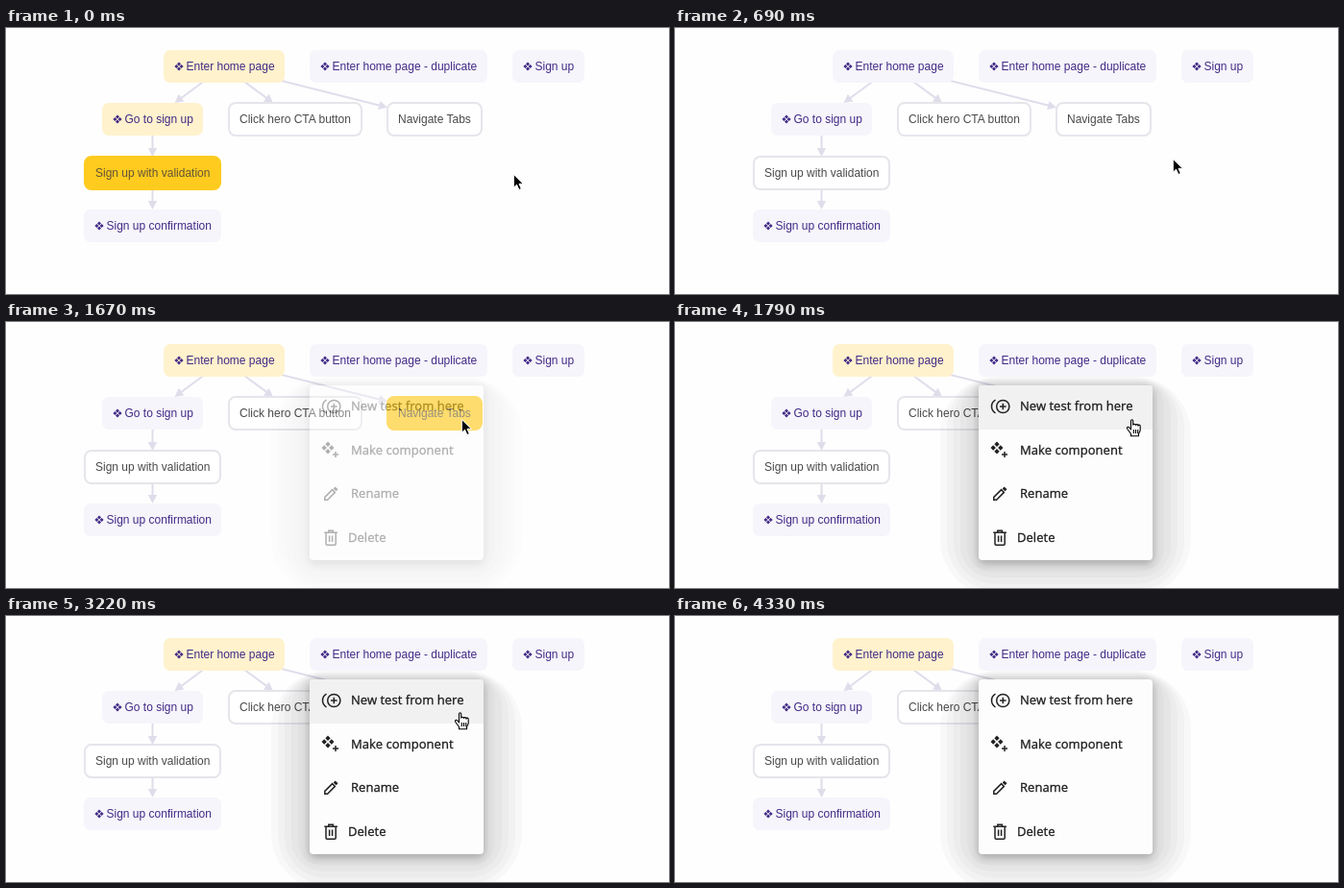
Recreate the animation shown at these times as an HTML page. Size 690 by 277 pixels, loop 4.51 s.

```html
<!DOCTYPE html>
<html lang="en">
<head>
<meta charset="utf-8">
<title>Test flow menu</title>
<style>
html, body { margin: 0; width: 100%; height: 100%; overflow: hidden; background: #fefefe; }
svg { display: block; }
text { font: 12px "Liberation Sans", Arial, sans-serif; white-space: pre; }
.part rect { fill: #f6f5fb; }
.part { fill: #422a86; }
.step rect { fill: #fff; stroke: #e6e5eb; stroke-width: 2; }
.step { fill: #494949; }
.node.trail rect { fill: #fff2cd; }
.node.active rect { fill: #ffcb1f; stroke: #ffcb1f; }
.node.active { fill: #635436; }
#links { stroke: #e0ddeb; stroke-width: 2; fill: #e0ddeb; }
#menu text {
  font: 500 13px "Open Sans", "Noto Sans", sans-serif; letter-spacing: .04px;
  fill: #1c1c1c; stroke: #1c1c1c; stroke-width: .3;
}
#panel { fill: #fdfdfd; filter: drop-shadow(0 4px 5px rgba(0,0,0,.22)); }
.icon { fill: none; stroke: #222; stroke-width: 1.5; }
.solid { fill: #222; }
</style>
</head>
<body>
<svg width="690" height="277" xmlns="http://www.w3.org/2000/svg">
  <g id="links"></g>
  <g id="nodes"></g>
  <g id="menu">
    <g id="shade"></g>
    <rect id="panel" x="316" y="66" width="181" height="182" rx="4"/>
    <path id="hover" fill="#f1f1f1" d="M316 112V70q0-4 4-4h173q4 0 4 4v42z"/>
    <g class="icon">
      <circle cx="341.3" cy="88" r="6.6"/>
      <path d="M341.3 84.7v6.6M338 88h6.6M333.5 81.2A7.8 7.8 0 0 0 333.5 94.8"/>
      <path d="M343 135v6M340 138h6"/>
      <path d="M331.8 185.2v-2.8l7.8-7.8 2.8 2.8-7.8 7.8z"/>
      <path d="M331.3 219.2h13.6M335.8 219v-1.8h4.6v1.8M333 219.5V231q0 1.2 1.2 1.2h7.8q1.2 0 1.2-1.2V219.5M336.6 222.5v6.5M339.6 222.5v6.5"/>
    </g>
    <path class="solid" d="M340.7 173.5l2-2 2.8 2.8-2 2z"/>
    <path class="solid" id="gems"/>
    <text x="359" y="92">New test from here</text>
    <text x="359" y="138">Make component</text>
    <text x="359" y="183">Rename</text>
    <text x="356" y="229">Delete</text>
  </g>
  <g id="cursor">
    <path id="arrow" stroke="#fff" d="M.3.5V14.2L3.5 11.2 5.9 16.5 8.3 15.4 6 10.3H10.4z"/>
    <g id="hand" transform="translate(-6.5 -1)" stroke="#000" stroke-width="1.1" stroke-linejoin="round">
      <path fill="#fff" d="M5 11L3.2 8.9C2 7.6.3 8.6 1.2 10.2L5 15.5V17.8H13V15.6L14.7 12V7.4C14.7 5.8 12.5 5.8 12.4 7.1 12.4 5.2 10 5.2 9.8 6.5 9.6 4.8 7.4 4.9 7.2 6.2V2C7.2.4 5 .4 5 2z"/>
      <path d="M7.8 11v4M10 11v4M12.2 11v4"/>
    </g>
  </g>
</svg>
<script>
const LOOP = 4510, HALF = 17;
const $ = id => document.getElementById(id);
const add = (parent, markup) => parent.insertAdjacentHTML('beforeend', markup);
const gem = (x, y, r) => `M${x} ${y - r}l${r} ${r}l${-r} ${r}l${-r} ${-r}z`;
const ring = (x, y, gap, r) =>
  gem(x, y - gap, r) + gem(x - gap, y, r) + gem(x + gap, y, r) + gem(x, y + gap, r);

const nodes = {
  home: { label: 'Enter home page', kind: 'part', row: 0, x: 226.8 },
  copy: { label: 'Enter home page - duplicate', kind: 'part', row: 0, x: 408.5 },
  sign: { label: 'Sign up', kind: 'part', row: 0, x: 564 },
  go: { label: 'Go to sign up', kind: 'part', row: 1, x: 152.5, parent: 'home' },
  hero: { label: 'Click hero CTA button', kind: 'step', row: 1, x: 301, parent: 'home' },
  tabs: { label: 'Navigate Tabs', kind: 'step', row: 1, x: 446, parent: 'home' },
  valid: { label: 'Sign up with validation', kind: 'step', row: 2, x: 152.5, parent: 'go' },
  done: { label: 'Sign up confirmation', kind: 'part', row: 3, x: 152.5, parent: 'valid' }
};

// Each box is as wide as its label plus padding
for (const [id, node] of Object.entries(nodes)) {
  const { label, kind, row, x } = node;
  const part = kind === 'part';
  const y = node.y = Math.round(40 + 55.4 * row);
  add($('nodes'), `<g id="${id}" class="node ${kind}"><rect/><text>${label}</text></g>`);
  const [rect, text] = $(id).children;
  const width = Math.round(text.getComputedTextLength() + (part ? 34 : 22));
  const left = Math.round(x - width / 2);
  const set = (el, attrs) => Object.entries(attrs).forEach(a => el.setAttribute(...a));
  set(rect, { x: left, y: y - HALF, width, height: 2 * HALF, rx: 7 });
  set(text, { x: left + (part ? 23.5 : 11), y: y + 4 });
  if (part) add($(id), `<path d="${ring(left + 16, y, 2.6, 2)}"/>`);
  node.half = width / 2;
}

// Links run between centres, behind the boxes, and point at the child's edge
for (const child of Object.values(nodes)) {
  const from = nodes[child.parent];
  if (!from) continue;
  const dx = child.x - from.x, dy = child.y - from.y;
  const full = Math.hypot(dx, dy);
  const tip = full * (1 - Math.min(child.half / Math.abs(dx), HALF / dy));
  add($('links'), `<g transform="translate(${from.x} ${from.y}) rotate(${Math.atan2(dy, dx) * 180 / Math.PI})">
    <path d="M0 0H${tip - 6}"/><path stroke="none" d="M${tip} 0l-9 -4.7v9.4z"/></g>`);
}

// Soft shadow as nested bands
for (let d = 40; d > 2; d -= 7) {
  add($('shade'), `<rect x="${316 - d}" y="${66 - d * .23}" width="${181 + 2 * d}"
    height="${182 + d * 1.18}" rx="${8 + d * 1.3}" opacity=".024"/>`);
}

$('gems').setAttribute('d', ring(335, 131, 3.8, 2.7));

// Cursor moves: time span, number of updates, destination, sideways swing
const moves = [
  { from: 420, to: 910, count: 10, x: 505, y: 115 },
  { from: 970, to: 1200, count: 5, x: 474, y: 101 },
  { from: 1670, to: 1790, count: 3, x: 476, y: 102 },
  { from: 2570, to: 2620, count: 2, x: 468, y: 101 },
  { from: 3220, to: 3630, count: 7, x: 495, y: 97, swing: 34 },
  { from: 3930, to: 4330, count: 8, x: 690, y: 300 }
];

function cursorAt(now) {
  let x = 528, y = 152, t = 0;
  for (const { from, to, count, swing = 0, ...end } of moves) {
    if (now < from) break;
    const gap = (to - from) / (count - 1);
    const step = Math.min(count, Math.floor((now - from) / gap + 1.1));
    const k = (step / count) ** 1.7;
    x += (end.x - x) * k + swing * Math.sin(Math.PI * k);
    y += (end.y - y) * k;
    t = from + gap * (step - 1);
  }
  return { x, y, t };
}

const show = (id, on) => $(id).style.display = on ? '' : 'none';

function highlight(active) {
  const trail = [];
  for (let id = nodes[active]?.parent; id; id = nodes[id].parent) trail.push(id);
  for (const id in nodes) {
    $(id).classList.toggle('active', id === active);
    $(id).classList.toggle('trail', trail.includes(id));
  }
}

function draw(now) {
  const { x, y, t } = cursorAt(now % LOOP);
  const onTabs = t > 1600 || x < 496 && y < 113;
  highlight(t < 520 ? 'valid' : onTabs ? 'tabs' : null);

  $('menu').style.opacity = Math.max(0, Math.min(1, (t - 1610) / 170));
  const over = t > 1740 && x < 504 && y < 112;
  show('hover', over);
  show('hand', over);
  show('arrow', !over);
  $('cursor').setAttribute('transform', `translate(${Math.round(x)} ${Math.round(y)})`);
}

const start = performance.now();
(function tick() {
  draw(performance.now() - start);
  requestAnimationFrame(tick);
})();
</script>
</body>
</html>
```
